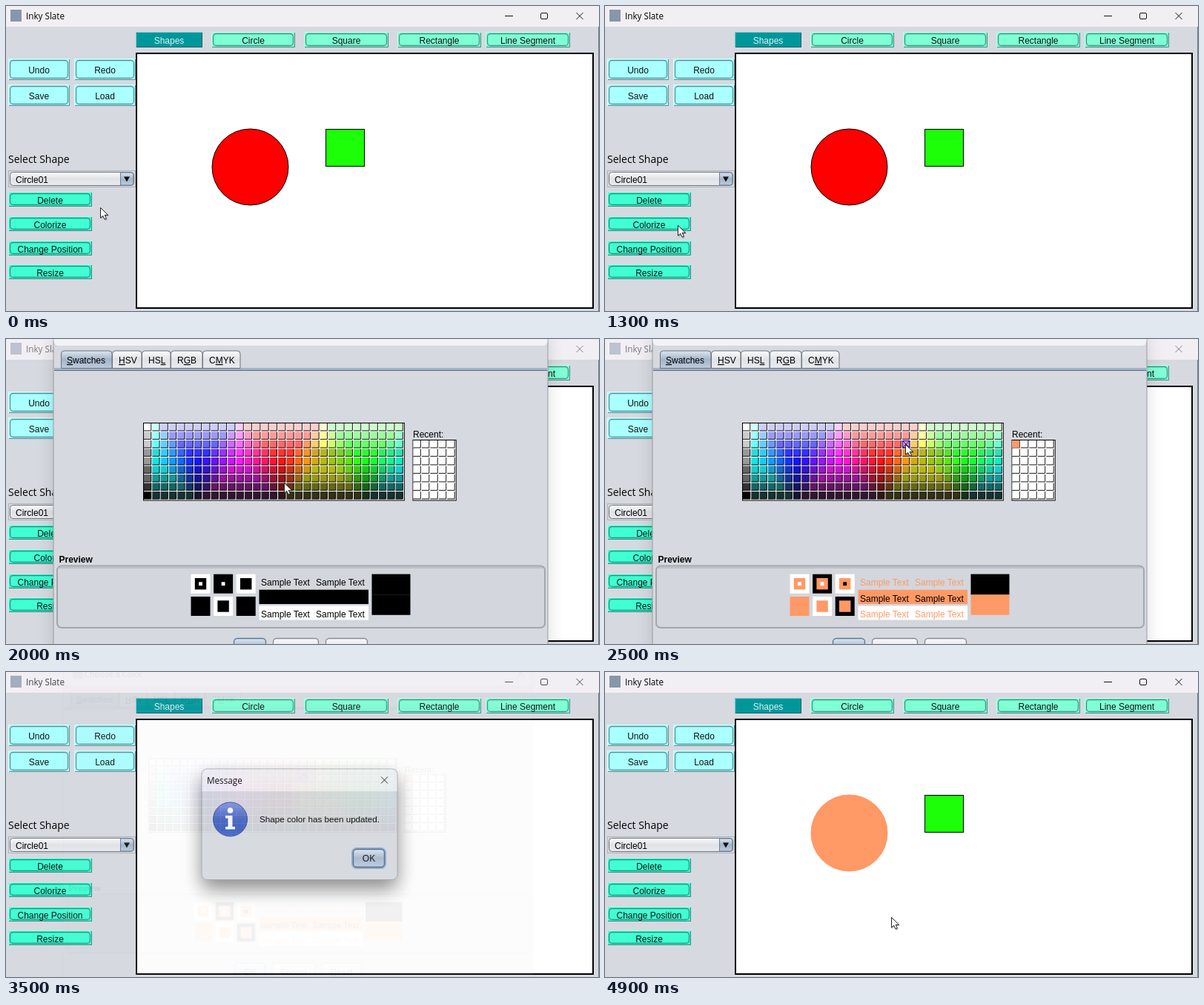
Animation, 800 px wide and 412 px high, one loop 5000 ms. Source, as an HTML page:

```html
<!DOCTYPE html>
<html lang="en">
<head>
<meta charset="utf-8">
<title>Inky Slate</title>
<style>
html, body { margin: 0; height: 100%; overflow: hidden; background: #d6d9df; }
svg { display: block; width: 100vw; height: 100vh; }
text { font: 12px "Liberation Sans", Arial, sans-serif; white-space: pre; }
.ui { font: 11.7px "Open Sans", sans-serif; }
.label { font: 14px "Open Sans", sans-serif; }
.bold { font-weight: bold; }
.mid { text-anchor: middle; }
.line { fill: none; stroke: #111; }
</style>
</head>
<body>
<svg id="stage" viewBox="0 0 800 412" preserveAspectRatio="none">
<defs>
  <linearGradient id="soft" x2="0" y2="1"><stop stop-color="#fafbfc"/><stop offset=".5" stop-color="#dfe2e7"/><stop offset="1" stop-color="#e9ebef"/></linearGradient>
  <linearGradient id="blue" x2="0" y2="1"><stop stop-color="#dde6f0"/><stop offset=".5" stop-color="#a3b5ca"/><stop offset="1" stop-color="#bccbdc"/></linearGradient>
  <linearGradient id="info" x2="0" y2="1"><stop stop-color="#7f9be0"/><stop offset=".5" stop-color="#4465c4"/><stop offset="1" stop-color="#3a60c8"/></linearGradient>
  <filter id="blur" x="-30%" y="-30%" width="160%" height="170%"><feGaussianBlur stdDeviation="13"/></filter>
</defs>
</svg>
<script>
const stage = document.getElementById('stage');
const ORANGE = '#ff9966', FACE = '#d6d9df';

const rect = (x, y, w, h, fill, more = '') =>
  `<rect x="${x}" y="${y}" width="${w}" height="${h}" fill="${fill}" ${more}/>`;
const path = (d, more = 'class="line"') => `<path d="${d}" ${more}/>`;
const text = (x, y, s, more = '') => `<text x="${x}" y="${y}" ${more}>${
  s.replace(/_(.)/, '<tspan text-decoration="underline">$1</tspan>')}</text>`;
const group = (id, body) => `<g id="${id}">${body}</g>`;
const cross = (x, y, r) =>
  path(`M${x - r} ${y - r}l${2 * r} ${2 * r}m0 ${-2 * r}l${-2 * r} ${2 * r}`);

// Bevelled button of the main window
function button(x, y, w, h, label, fill, ink = '#111') {
  const flat = ink !== '#111';
  return rect(x, y, w, h, fill) +
    path(`M${x + .5} ${y + h}V${y + .5}H${x + w}`, 'fill="none" stroke="#fff" stroke-opacity=".5"') +
    path(`M${x + 1} ${y + h - .5}H${x + w - .5}V${y + 1}`, 'fill="none" stroke="#234" stroke-opacity=".55"') +
    (flat ? '' : rect(x + 2.5, y + 2.5, w - 5, h - 5, fill,
      'rx="4" stroke="#123c46" stroke-opacity=".55" stroke-width="1.3"')) +
    text(x + w / 2, Math.round(y + h / 2 + 5.5), label, `class="mid" fill="${ink}"`);
}

function softButton(x, y, w, h, label, fill = 'url(#soft)', edge = '#858b95') {
  return rect(x + .5, y + .5, w - 1, h - 1, fill, `rx="4.5" stroke="${edge}" stroke-width="1.3"`) +
    text(x + w / 2, y + h / 2 + 4.4, label, 'class="mid"');
}

function mainWindow() {
  const aqua = '#aaffff', mint = '#40ffd2', pale = '#7fffd4';
  let s = rect(0, 0, 800, 412, FACE) + rect(0, 0, 800, 28, '#f2eff4') +
    group('caption', rect(6, 5, 15, 16, '#8796ab') + text(27, 18, 'Inky Slate', 'class="ui"') +
      path('M673 13.5H684') + rect(721.5, 9.5, 9, 8, 'none', 'rx="1.5" stroke="#111"') + cross(774, 13.5, 4.5)) +
    rect(799, 28, 1, 384, '#777b82');
  s += button(175, 35, 90, 21, 'Shapes', '#00979b', '#d5f4f5');
  [['Circle', 277, 113], ['Square', 402, 114], ['Rectangle', 528, 113], ['Line Segment', 647, 114]]
    .forEach(([name, x, w]) => s += button(x, 35, w, 21, name, pale));
  ['Undo', 'Redo', 'Save', 'Load'].forEach((name, i) =>
    s += button(i % 2 ? 92 : 3, i < 2 ? 71 : 106, 83, 29, name, aqua));
  s += text(3, 212, 'Select Shape', 'class="label"') +
    rect(3.5, 222.5, 171, 22, FACE, 'stroke="#aeb3bb"') +
    rect(5.5, 224.5, 167, 18, 'url(#soft)', 'rx="4" stroke="#6f7681"') +
    path('M154.5 225H169q3 0 3 4V238q0 4-3 4H154.5Z', 'fill="url(#blue)" stroke="#6d7f95"') +
    path('M159 230.5h8l-4 7Z', 'fill="#111"') + text(13, 239, 'Circle01');
  ['Delete', 'Colorize', 'Change Position', 'Resize'].forEach((name, i) =>
    s += button(3, 251 + Math.round(i * 32.8), 113, 20, name, mint));
  return s + rect(176, 64, 616, 344, '#fff', 'stroke="#000" stroke-width="2"') +
    group('shapes', '<circle id="disc" cx="329.5" cy="217.5" r="51.5"/>' +
      rect(431.5, 166.5, 52, 50, '#1cff08', 'stroke="#000"'));
}

// Hues run from cyan through blue, red and green; rows set the lightness.
// Below the pale rows the bright hues are toned down to a common luminance.
function swatch(col, row) {
  if (!col) return [255, 204, 204, 153, 153, 102, 102, 51, 0].map(v => `rgb(${v},${v},${v})`)[row];
  const wave = peak => {
    const d = Math.abs((col + 44 - peak) % 30 - 15);
    return 51 * Math.max(0, Math.min(5, 10 - d));
  };
  const low = Math.max(20, 204 - 51 * row), high = Math.min(255, 255 - 51 * (row - 4));
  const rgb = [15, 25, 5].map(p => Math.min(high, Math.max(low, wave(p))));
  const luma = .3 * rgb[0] + .59 * rgb[1] + .11 * rgb[2];
  const tone = row < 3 ? 1 : Math.min(1, 165 / luma);
  return `rgb(${rgb.map(v => Math.round(v * tone))})`;
}

function cells(x, y, cols, rows, dx, dy, color) {
  let s = rect(x - .5, y - .5, cols * dx + 1, rows * dy + 1, '#fff', 'stroke="#000"');
  for (let r = 0; r < rows; r++) for (let c = 0; c < cols; c++) {
    const cx = x + c * dx, cy = y + r * dy;
    s += rect(cx, cy, dx - 1.2, dy - 1.2, color(c, r)) +
      path(`M${cx} ${cy + dy - 1.6}h${dx - 1.6}V${cy}`, 'fill="none" stroke="#000" stroke-width=".9"');
  }
  return s;
}

function preview() {
  const nest = (col, row, ...fills) => fills.map((fill, i) => {
    const gap = 5.3 * i, size = 26 - 2 * gap;
    return rect(249.5 + col * 30.6 + gap, 317.7 + row * 30.3 + gap, size, size, fill);
  }).join('');
  const c = 'currentColor', pair = (y, fill) =>
    [344, 418].map(x => text(x, y, 'Sample Text', `fill="${fill}"`)).join('');
  return nest(0, 0, '#fff', c, '#fff') + nest(1, 0, '#000', c, '#fff') + nest(2, 0, '#fff', c, '#000') +
    nest(0, 1, c) + nest(1, 1, '#fff', c) + nest(2, 1, '#000', c) +
    pair(333, c) + rect(341.5, 338.7, 147.5, 19.3, c) + pair(354.5, '#000') +
    rect(341.5, 360.5, 147.5, 19, '#fff') + pair(375.5, c) +
    rect(493.5, 317.6, 52, 28, '#000') + rect(493.5, 345.3, 52, 27.5, c);
}

function chooser() {
  let s = rect(66, -4, 663, 460, '#000', 'filter="url(#blur)" opacity=".16"') +
    rect(64, -24, 667, 480, FACE, 'rx="7" stroke="#9a9ca2"') +
    rect(64.5, -23, 666, 32, '#f3f2f5', 'rx="6"') +
    rect(77, -16, 15, 16, '#8796ab') + text(94, -3, 'Choose a Color', 'class="ui"') + cross(713.5, -7.5, 5);
  s += rect(65, 39, 665, 4, '#a3b4c7') + path('M65 42.5H730', 'stroke="#566b80"');
  [['_Swatches', 74, 69], ['_HSV', 143, 40], ['HS_L', 183, 39], ['R_GB', 222, 43], ['C_MYK', 265, 51]]
    .forEach(([name, x, w], i) => s += path(`M${x + .5} 39.5V20q0-4 4-4H${x + w - 4}q4 0 4 4V39.5Z`,
      `fill="url(#${i ? 'soft' : 'blue'})" stroke="#6c727c"`) + text(x + (i ? 9 : 8), 33, name));
  s += cells(186, 114, 31, 9, 11.32, 11.5, swatch) +
    text(549, 133, 'Recent:') + cells(549.5, 137, 5, 7, 11.45, 11.5, () => '#fff') +
    group('picked', rect(549.5, 137, 9.6, 9.6, ORANGE) +
      path('M401.5 137.5h9.3v9.3h-9.3Zl9.3 9.3m0-9.3l-9.3 9.3', 'fill="none" stroke="#00f"')) +
    text(71.5, 302, 'Preview', 'class="bold"') +
    rect(69, 306.5, 658, 83.5, '#d3d6dc', 'rx="6" stroke="#a2a7af" stroke-width="2"') +
    path('M72 309H724', 'stroke="#bcc0c7" stroke-width="2"') + preview() +
    softButton(307, 404, 44, 25, 'OK', 'url(#blue)', '#5d7590') +
    softButton(360, 404, 62, 25, 'Cancel') + softButton(431, 404, 57, 25, '_Reset');
  return s;
}

function message() {
  return rect(264, 143, 264, 150, '#000', 'rx="8" filter="url(#blur)" opacity=".5"') +
    rect(264, 131, 264, 149.5, FACE, 'rx="7" stroke="#a3a6ad"') +
    path('M264.5 161V138q0-6.5 7-6.5H520.5q7 0 7 6.5V161Z', 'fill="#f2f1f5"') +
    text(271, 151, 'Message', 'class="ui"') + cross(510.5, 146, 4.5) +
    '<circle cx="302.5" cy="199" r="23" fill="url(#info)" stroke="#3150a0"/>' +
    '<circle cx="302.5" cy="187" r="3.8" fill="#fff"/>' +
    path('M296 194h9.5v15h3.5v3.5h-13v-3.5h3.5v-11.5h-3.5Z', 'fill="#fff"') +
    text(342, 203, 'Shape color has been updated.', 'style="font-size:11.67px"') +
    rect(467, 238, 45, 27, 'none', 'rx="6" stroke="#8ba8c8" stroke-width="2"') +
    softButton(468, 239, 43, 25, 'OK', 'url(#blue)', '#426089');
}

stage.insertAdjacentHTML('beforeend', mainWindow() + group('message', message()) + group('chooser', chooser()) +
  group('cursor', path('M1.5 2v14l3.3-3 2.3 5 2.5-1.2-2.2-4.8h4.6Z', 'fill="#000" opacity=".25"') +
    path('M.5 .5v13.8l3.2-3 2.3 4.9 2.4-1.1-2.2-4.7h4.5Z', 'fill="#fff" stroke="#222"')));
const el = id => document.getElementById(id);

// Linear interpolation through [time, ...values] stops
function at(t, stops) {
  const i = stops.findIndex(s => s[0] > t);
  if (i < 0) return stops[stops.length - 1].slice(1);
  if (!i) return stops[0].slice(1);
  const a = stops[i - 1], b = stops[i], k = (t - a[0]) / (b[0] - a[0]);
  return a.slice(1).map((v, j) => v + (b[j + 1] - v) * k);
}

const cursorPath = [[0, 127, 272], [700, 117, 305], [1100, 98, 296], [1300, 98, 296], [1600, 155, 297],
  [2000, 375, 194], [2300, 405, 142], [2600, 405, 142], [3000, 385, 408], [3200, 335, 416],
  [3500, 335, 424], [3700, 390, 370], [4100, 488, 252], [4300, 488, 252], [4900, 386, 331]];
const captionFade = [[1400, 1], [1700, .5], [3300, .5], [3500, .72], [3700, .5], [4300, .5], [4500, 1]];
// opacity, scale
const chooserPose = [[1400, 0, .87], [1500, .15, .88], [1600, .5, .918], [1700, .9, .98], [1800, 1, 1],
  [3200, 1, 1], [3300, .85, .99], [3400, .35, .965], [3500, .05, .949], [3600, 0, .94]];
const messagePose = [[3300, 0, .94], [3400, .4, .96], [3500, .94, 1], [3600, 1, 1.029],
  [4200, 1, 1.029], [4300, .8, 1.01], [4400, .25, .98], [4500, 0, .96]];

function pose(id, t, stops, cx, cy) {
  const [alpha, scale] = at(t, stops), g = el(id);
  g.style.display = alpha ? '' : 'none';
  g.setAttribute('opacity', alpha);
  g.setAttribute('transform', `translate(${cx} ${cy}) scale(${scale}) translate(${-cx} ${-cy})`);
}

function draw(now) {
  const t = Math.floor(now % 5000 / 100) * 100;
  const picked = t >= 2400, done = t >= 4300;
  pose('chooser', t, chooserPose, 329, 185);
  pose('message', t, messagePose, 396, 206);
  el('chooser').style.color = picked ? ORANGE : '#000';
  el('picked').style.display = picked ? '' : 'none';
  el('caption').setAttribute('opacity', at(t, captionFade)[0]);
  el('shapes').style.display = t >= 3200 && !done ? 'none' : '';
  el('disc').setAttribute('fill', done ? ORANGE : '#f00');
  el('disc').setAttribute('stroke', done ? ORANGE : '#000');
  el('cursor').setAttribute('transform', `translate(${at(t, cursorPath).map(Math.round)})`);
}

const start = performance.now();
(function loop() {
  draw(performance.now() - start);
  requestAnimationFrame(loop);
})();
</script>
</body>
</html>
```
